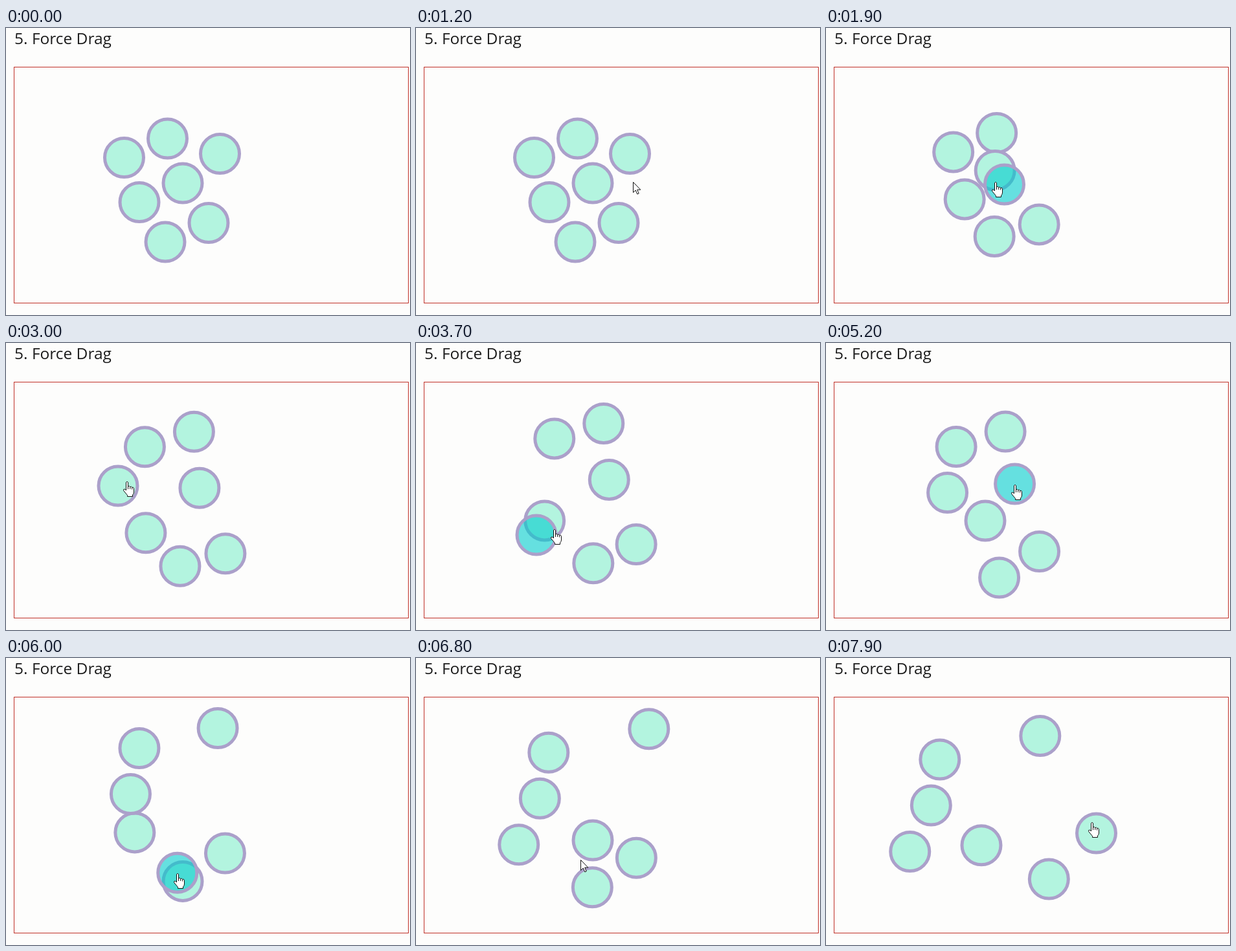
Animation of 624 by 444 pixels, one loop 8 s. Source, as an HTML page with a canvas:

```html
<!DOCTYPE html>
<html lang="en">
<head>
<meta charset="utf-8">
<title>Force Drag</title>
<style>
  html, body { margin: 0; width: 100%; height: 100%; overflow: hidden; background: #fdfdfc; }
  canvas { position: absolute; left: 0; top: 0; }
  h1 {
    position: absolute; left: 13px; top: -1px; margin: 0;
    font: 400 24.5px/33px "Open Sans", "Noto Sans", sans-serif;
    color: #1c1c1c; white-space: nowrap;
  }
</style>
</head>
<body>
<canvas id="stage" width="624" height="444"></canvas>
<h1>5. Force Drag</h1>
<script>
const ctx = document.getElementById('stage').getContext('2d');
const LOOP = 8000, STEP = 100, RADIUS = 30;

const add = (a, b) => [a[0] + b[0], a[1] + b[1]];
const sub = (a, b) => [a[0] - b[0], a[1] - b[1]];
const mix = (a, b, k) => [a[0] + (b[0] - a[0]) * k, a[1] + (b[1] - a[1]) * k];

// Packed nodes sit on a lattice of touching pairs.
const corner = [182.5, 200.5], across = [67, -29.5], down = [23.5, 69], slant = [40, 61.5];
const B = add(corner, across), E = add(corner, down), D = add(E, across);
const nodes0 = [corner, B, [330.5, 194.5], D, E, add(D, slant), add(E, slant)];

// Each drag moves one node to `end`; `push` holds the neighbours it knocks aside.
const drags = [
  { from: 1400, to: 1900, node: 2, grip: [-14, -4], end: [275.5, 242],
    push: { 3: [-26, -11], 4: [-6, 4], 5: [2, 11] } },
  { from: 1900, to: 2800, node: 2, grip: [-14, -4], end: [173, 221],
    push: { 0: [0, -35], 1: [9, -29], 3: [20, 0], 4: [-16, 25], 5: [-8, 18], 6: [-9, 19] } },
  { from: 3100, to: 4400, node: 2, grip: [28, -9], end: [152.5, 273],
    push: { 4: [-36, -13], 5: [4, -3], 6: [12, 18] } },
  { from: 4400, to: 4900, node: 2, grip: [28, -9], end: [246, 275],
    push: { 3: [6, -6], 4: [21, -49] } },
  { from: 5200, to: 6600, node: 3, grip: [0, 1], end: [273, 282],
    push: { 1: [79, -13], 2: [-91, 28], 5: [7, 1], 6: [1, 6] } },
  { from: 7000, to: 7800, node: 6, grip: [-7, -17], end: [417.5, 271],
    push: { 3: [-4, -3], 5: [33, 22] } }
];

// Pointer turns that are not the start or end of a drag
const path = [
  [500, [2, 374]], [1100, [344, 262]], [3700, [214, 288]],
  [5400, [540, 200]], [5600, [50, 285]], [5800, [262, 350]], [6800, [254, 312]]
].map(([t, at]) => ({ t, at }));

// The centring force: when one node moves, the other six balance it.
function balance(nodes, held, moved) {
  const shift = [-moved[0] / 6, -moved[1] / 6];
  return nodes.map((n, i) => i === held ? n : add(n, shift));
}

let rest = nodes0;
for (const d of drags) {
  const start = rest[d.node];
  const pushes = Object.values(d.push);
  const moved = pushes.reduce(add, sub(d.end, start));
  const pushed = rest.map((n, i) => i === d.node ? d.end : add(n, d.push[i] || [0, 0]));
  d.before = rest;
  d.after = rest = balance(pushed, d.node, moved);
  path.push({ t: d.from, at: add(start, d.grip) }, { t: d.to, at: add(d.end, d.grip) });
}
path.sort((a, b) => a.t - b.t);

function pointerAt(t) {
  const i = path.findIndex(p => p.t > t);
  if (i === 0) return null;
  if (i < 0) return path[path.length - 1].at;
  const a = path[i - 1], b = path[i];
  return mix(a.at, b.at, (t - a.t) / (b.t - a.t));
}

function nodesAt(t, drag, pointer) {
  if (!drag) {
    const last = drags.filter(d => d.to <= t).pop();
    return last ? last.after : nodes0;
  }
  const k = (t - drag.from) / (drag.to - drag.from);
  const nodes = drag.before.map((n, i) => mix(n, drag.after[i], k));
  const held = sub(pointer, drag.grip);
  const moved = sub(held, nodes[drag.node]);
  nodes[drag.node] = held;
  return balance(nodes, drag.node, moved);
}

function drawNode([x, y], fill) {
  ctx.beginPath();
  ctx.arc(x, y, RADIUS, 0, Math.PI * 2);
  ctx.fillStyle = fill;
  ctx.fill();
  ctx.lineWidth = 5;
  ctx.strokeStyle = '#aba0ca';
  ctx.stroke();
}

const arrow = new Path2D('M.5 .5V16.5L4.2 13L6.8 19L9.2 18L6.7 12.2H11.8Z');
const hand = new Path2D('M-1.5 1.5Q0 -.8 1.5 1.5V8Q3.5 6.3 4.7 8.6Q6.5 7.2 7.7 9.4' +
  'Q10.5 8.5 10.5 12V17Q10 20 8.5 21V23.5H.5V21.5L-5.3 14.5Q-6 11.6 -3.5 12L-1.5 14Z');
const knuckles = new Path2D('M1.5 8V12M4.7 8.6V12M7.7 9.4V12.5');

function drawPointer([x, y], over) {
  const shape = over ? hand : arrow;
  ctx.save();
  ctx.translate(Math.round(x), Math.round(y));
  ctx.lineWidth = 1;
  ctx.lineJoin = 'round';
  ctx.fillStyle = '#fff';
  ctx.strokeStyle = '#111';
  ctx.fill(shape);
  ctx.stroke(shape);
  if (over) ctx.stroke(knuckles);
  ctx.restore();
}

function draw(t) {
  const pointer = pointerAt(t);
  const drag = drags.find(d => t >= d.from && t < d.to);
  const nodes = nodesAt(t, drag, pointer);

  ctx.clearRect(0, 0, 624, 444);
  ctx.lineWidth = 1;
  ctx.strokeStyle = '#c03028';
  ctx.strokeRect(12.5, 60.5, 609, 365);

  nodes.forEach((n, i) => {
    if (!drag || i !== drag.node) drawNode(n, '#b3f4df');
  });
  if (drag) drawNode(nodes[drag.node], 'rgba(0, 206, 205, 0.6)');
  if (pointer) {
    const over = nodes.some(n => Math.hypot(...sub(n, pointer)) < RADIUS + 2.5);
    drawPointer(pointer, over);
  }
}

const start = performance.now();
function tick() {
  const t = (performance.now() - start) % LOOP;
  draw(Math.floor(t / STEP) * STEP);
  requestAnimationFrame(tick);
}
tick();
</script>
</body>
</html>
```
